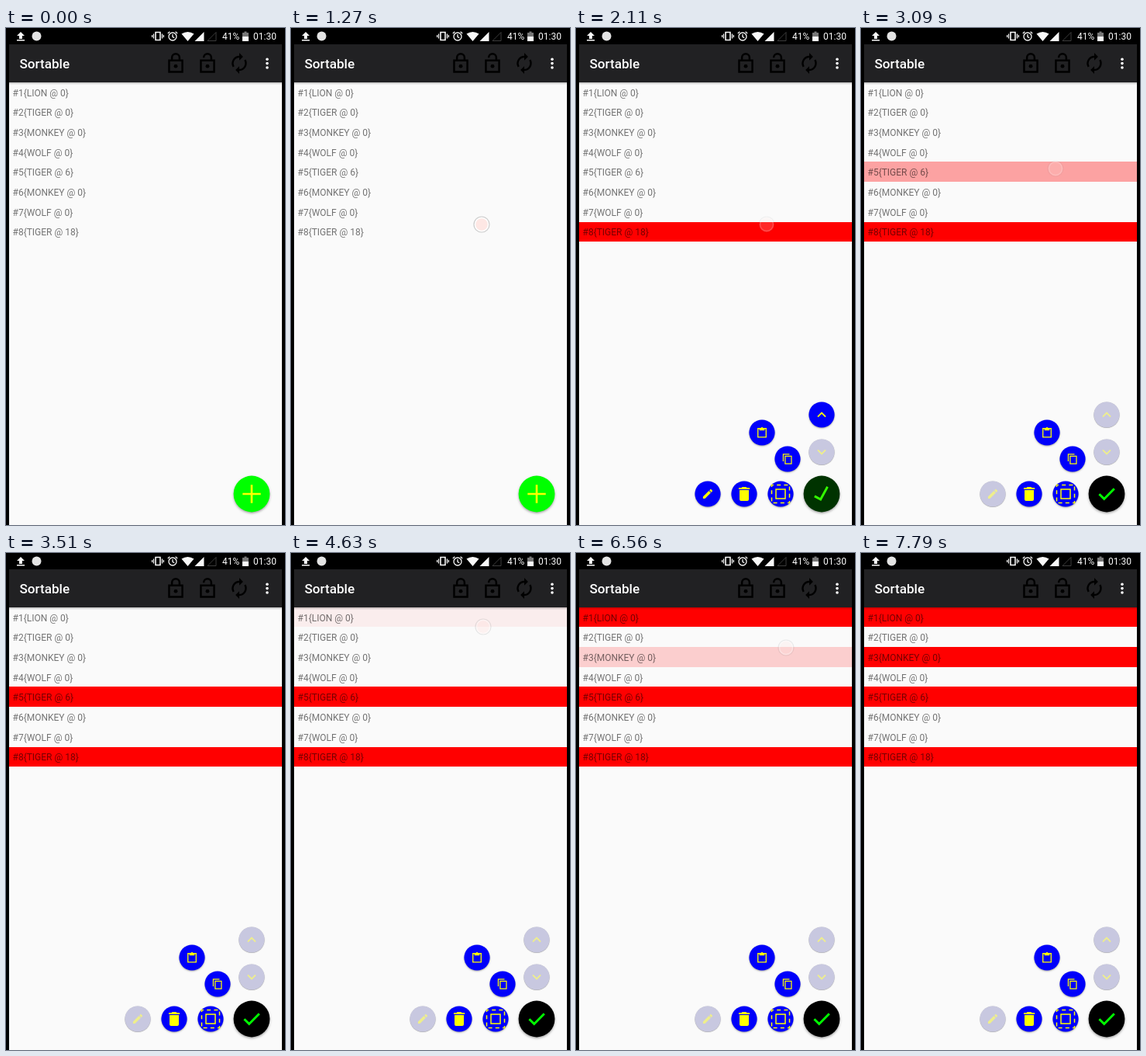
Animation, 360 px wide and 640 px high, one loop 8000 ms. Source, as an HTML page with a canvas:

```html
<!DOCTYPE html>
<html lang="en">
<head>
<meta charset="utf-8">
<title>Sortable</title>
<style>
html, body { margin: 0; width: 100%; height: 100%; overflow: hidden; background: #000; }
canvas { display: block; width: 100vw; height: 100vh; }
</style>
</head>
<body>
<canvas id="stage" width="360" height="640"></canvas>
<script>
const ctx = document.getElementById('stage').getContext('2d');
const LOOP = 8000;
const PAPER = [250, 250, 250], BLUE = [0, 0, 250], DISABLED = [200, 200, 224];
const BAR = '#212123', YELLOW = '#ffff00';
const ROW_TOP = 69.65, ROW_HEIGHT = 25.7;
const ROWS = ['LION @ 0', 'TIGER @ 0', 'MONKEY @ 0', 'WOLF @ 0',
  'TIGER @ 6', 'MONKEY @ 0', 'WOLF @ 0', 'TIGER @ 18'];

const TOUCHES = [
  { row: 7, x: 246, y: 253, down: 1230, select: 1430, up: 2010, fade: 130, strength: 1 },
  { row: 4, x: 251, y: 181, down: 2450, select: 2950, up: 2950, fade: 250, strength: .5 },
  { row: 0, x: 248, y: 95, down: 4130, select: 4610, up: 4610, fade: 250, strength: .5 },
  { row: 2, x: 271, y: 122, down: 6180, select: 6490, up: 6490, fade: 250, strength: .5 },
];
const MENU_START = TOUCHES[0].select;
const MULTI_START = TOUCHES[1].select;

// Icons live on a 24-unit grid.
const ICONS = {
  lock: { stroke: 'M5 9h14v12H5z M8 9V6a4 4 0 0 1 8 0v3', fill: 'M10 15a2 2 0 1 1 4 0a2 2 0 1 1-4 0' },
  unlock: { stroke: 'M5 9h14v12H5z M8 6a4 4 0 0 1 8 0v3', fill: 'M10 15a2 2 0 1 1 4 0a2 2 0 1 1-4 0' },
  renew: { stroke: 'M12 5a7 7 0 0 0-6 10.5 M12 19a7 7 0 0 0 6-10.5', fill: 'M12 1l4 4-4 4z M12 15l-4 4 4 4z' },
  up: { stroke: 'M6.7 14.7L12 9.4l5.3 5.3' },
  down: { stroke: 'M6.7 9.3L12 14.6l5.3-5.3' },
  paste: { stroke: 'M4 4h16v17H4z', fill: 'M7 4h10v4H7z M9.5 4a2.5 2.5 0 0 1 5 0z' },
  copy: { stroke: 'M3 17V2h13 M7 6h13v16H7z' },
  edit: { fill: 'M3 17.2V21h3.8L17.8 9.9l-3.7-3.7z M20.7 7q.8-.7 0-1.4l-2.3-2.3q-.7-.7-1.4 0l-1.8 1.9 3.7 3.7z' },
  bin: { fill: 'M6 19q0 2 2 2h8q2 0 2-2V7H6z M19 4h-3.5l-1-1h-5l-1 1H5v2h14z' },
  select: { stroke: 'M6 6h12v12H6z', dashed: 'M.5 .5h23v23H.5z' },
};
for (const icon of Object.values(ICONS))
  for (const part in icon) icon[part] = new Path2D(icon[part]);

const BUTTONS = [
  { icon: 'up', x: 317, y: 498, scale: .95, disabledFrom: MULTI_START },
  { icon: 'down', x: 317, y: 546, scale: .95, disabledFrom: 0 },
  { icon: 'paste', x: 240, y: 521, scale: .66 },
  { icon: 'copy', x: 273, y: 555, scale: .62 },
  { icon: 'edit', x: 170, y: 600, scale: .68, disabledFrom: MULTI_START },
  { icon: 'bin', x: 217, y: 600, scale: 1 },
  { icon: 'select', x: 264, y: 600, scale: 1, line: 1.5 },
];

const progress = (t, start, duration) => Math.min(1, Math.max(0, (t - start) / duration));
const mix = (from, to, p) => `rgb(${from.map((c, i) => c + (to[i] - c) * p)})`;
const rowTop = row => Math.round(ROW_TOP + row * ROW_HEIGHT);

function rect(x, y, w, h, color) {
  ctx.fillStyle = color;
  ctx.fillRect(x, y, w, h);
}

function disc(x, y, r, color) {
  ctx.fillStyle = color;
  ctx.beginPath();
  ctx.arc(x, y, r, 0, 7);
  ctx.fill();
}

function ring(x, y, r, color, line) {
  ctx.strokeStyle = color;
  ctx.lineWidth = line;
  ctx.beginPath();
  ctx.arc(x, y, r, 0, 7);
  ctx.stroke();
}

function text(string, x, y, font, color) {
  ctx.font = font + ' Roboto, sans-serif';
  ctx.fillStyle = color;
  ctx.fillText(string, x, y);
}

function path(d, color, line) {
  const shape = new Path2D(d);
  if (line) {
    ctx.strokeStyle = color;
    ctx.lineWidth = line;
    ctx.stroke(shape);
  } else {
    ctx.fillStyle = color;
    ctx.fill(shape);
  }
}

function drawIcon(name, x, y, scale, color, line = 2) {
  const { stroke, fill, dashed } = ICONS[name];
  ctx.save();
  ctx.translate(x, y);
  ctx.scale(scale, scale);
  ctx.translate(-12, -12);
  ctx.strokeStyle = ctx.fillStyle = color;
  ctx.lineWidth = line;
  if (stroke) ctx.stroke(stroke);
  if (fill) ctx.fill(fill);
  if (dashed) {
    ctx.setLineDash([5, 4.2]);
    ctx.lineDashOffset = 2.5;
    ctx.stroke(dashed);
  }
  ctx.restore();
}

function raisedDisc(x, y, r, color, depth, shade = .35) {
  ctx.save();
  ctx.shadowColor = `rgba(0,0,0,${shade})`;
  ctx.shadowBlur = depth * 2;
  ctx.shadowOffsetY = depth;
  disc(x, y, r, color);
  ctx.restore();
}

function drawStatusBar() {
  const white = '#f8f8f8';
  rect(0, 0, 360, 21, '#000');
  path('M19 5l5 5h-3v4h-4v-4h-3z M14 15h10v1.5H14z', white);
  disc(39.5, 10.5, 6, '#e4e4e4');
  path('M193 5.5h6v10h-6z', white, 1.6);
  path('M190.5 7.5v6 M188.6 9v3 M201.5 7.5v6 M203.4 9v3', white, 1.2);
  path('M220 11a5 5 0 1 1-10 0a5 5 0 1 1 10 0 M215 8v3.3l2.3 1.4 M208.8 7l2.6-2.2 M221.2 7l-2.6-2.2', white, 1.3);
  path('M226.5 7.5q8-5 16 0L234.5 17z', white);
  path('M255.5 5v12h-12z', white);
  path('M271 5.5v11h-11z', '#3c3c3c', 1);
  text('41%', 279, 15, '12px', white);
  path('M305 6h2.5V4.5h3V6h2.5v11h-8z', '#777');
  rect(305, 11, 8, 6, white);
  text('01:30', 319, 15, '12px', white);
}

function drawToolbar() {
  rect(4, 21, 352, 49, BAR);
  const shadow = ctx.createLinearGradient(0, 70, 0, 73);
  shadow.addColorStop(0, 'rgba(0,0,0,.25)');
  shadow.addColorStop(1, 'rgba(0,0,0,0)');
  rect(4, 70, 352, 3, shadow);
  text('Sortable', 17.5, 52, '500 17.1px', '#fff');
  ['lock', 'unlock', 'renew'].forEach((name, i) => drawIcon(name, 219 + i * 41, 45.5, 1.22, '#000'));
  for (const y of [40.2, 45.6, 51]) disc(337, y, 1.8, '#fff');
}

function drawRows(t) {
  for (const { row, select } of TOUCHES) {
    const top = rowTop(row);
    rect(4, top, 352, rowTop(row + 1) - top, `rgba(255,0,0,${progress(t, select, 400)})`);
  }
  ROWS.forEach((name, i) =>
    text(`#${i + 1}{${name}}`, 8.5, Math.round(87.8 + i * 25.66), '12px', 'rgba(0,0,0,.54)'));
}

function drawButtons(t) {
  const shown = progress(t, MENU_START, 440);
  if (!shown) return;
  for (const { icon, x, y, scale, line, disabledFrom = Infinity } of BUTTONS) {
    const disabled = t >= disabledFrom;
    raisedDisc(x, y, 16.6, mix(PAPER, disabled ? DISABLED : BLUE, shown), disabled ? .4 : 1, .35 * shown);
    ctx.globalAlpha = Math.min(1, shown * 2);
    drawIcon(icon, x, y, scale, disabled ? '#eeee8c' : YELLOW, line);
    ctx.globalAlpha = 1;
  }
}

function drawMainButton(t) {
  const p = progress(t, MENU_START + 50, 790);
  raisedDisc(317, 600, 23.4, `rgb(0,${255 * (1 - p)},0)`, 1.5);
  const swap = progress(p, .4, .2);
  const glyph = (d, angle, alpha, color, line) => {
    ctx.save();
    ctx.translate(317, 600);
    ctx.rotate(angle * Math.PI / 180);
    ctx.globalAlpha = alpha;
    path(d, color, line);
    ctx.restore();
  };
  glyph('M-11.7 0h23.4 M0-11.7v23.4', -110 * p, 1 - swap, YELLOW, 2.6);
  glyph('M-9.6 .2l6.3 6.2L9.8-6.8', -80 * (1 - p), swap, `rgb(${255 * (1 - p)},255,0)`, 2.9);
}

function drawTouches(t) {
  for (const { x, y, down, up, fade, strength } of TOUCHES) {
    if (t < down || t >= up + fade) continue;
    ctx.globalAlpha = strength * (1 - progress(t, up, fade));
    disc(x, y, 9, 'rgba(255,226,222,.8)');
    ring(x, y, 8.6, 'rgba(255,255,255,.9)', 1.6);
    ring(x, y, 10, 'rgba(120,120,120,.35)', 1.2);
  }
  ctx.globalAlpha = 1;
}

function frame(now) {
  const t = now % LOOP;
  rect(0, 0, 360, 640, '#000');
  rect(4, 70, 352, 570, `rgb(${PAPER})`);
  drawRows(t);
  drawToolbar();
  drawStatusBar();
  drawButtons(t);
  drawMainButton(t);
  drawTouches(t);
  requestAnimationFrame(frame);
}
requestAnimationFrame(frame);
</script>
</body>
</html>
```
